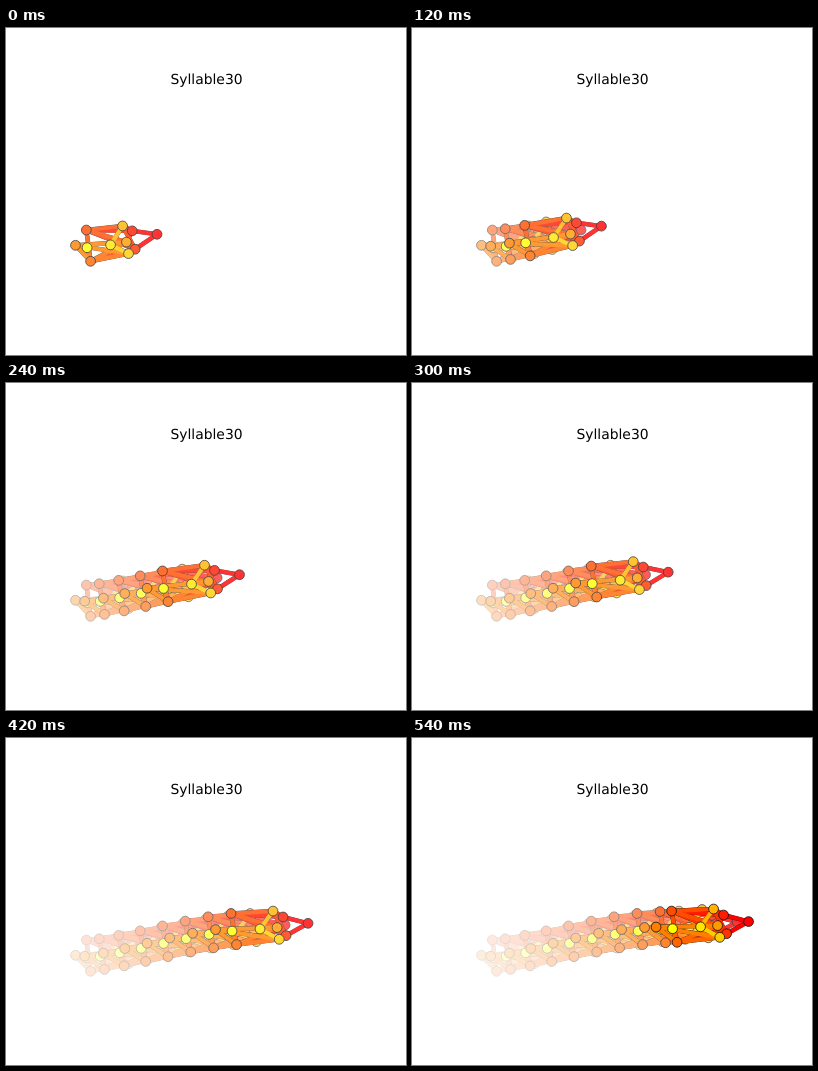
Animation, 400 px wide and 327 px high, one loop 600 ms. Source, as an HTML page with a canvas:

```html
<!DOCTYPE html>
<html lang="en">
<head>
<meta charset="utf-8">
<title>Syllable30</title>
<style>
  html, body { margin: 0; width: 100%; height: 100%; overflow: hidden; background: #fff; }
  canvas { display: block; }
</style>
</head>
<body>
<canvas id="stage" width="400" height="327"></canvas>
<script>
const W = 400, H = 327, STEPS = 10, STEP_MS = 60;
const ctx = document.getElementById('stage').getContext('2d');

// Stretched-out body, each joint relative to the nose
const body = {
  A: [0, 0],
  B: [-25, -3.3], C: [-22, 15],
  D: [-77, -0.5], E: [-71.5, 30], F: [-92.5, 17.5],
  G: [-31, 8], H: [-35, -8], I: [-28.8, 19.5],
  J: [-48, 11.5], K: [-76, 17]
};
const joints = Object.keys(body);

// A link takes the colour of its first joint
const links = 'AB AC BD BG BH CD CG CH CI CE DH DG DE EI EG EK FE FI FG FK HJ IJ'.split(' ');

const color = j => `rgb(255,${Math.round(255 * joints.indexOf(j) / (joints.length - 1))},0)`;

function ease(u) {
  u = Math.min(1, Math.max(0, u));
  return u * u * (3 - 2 * u);
}

// The run starts tucked up, gains speed, then the body levels out;
// the last step is only half as long
function pose(step) {
  const s = Math.min(step, 8.5);
  const noseX = 151 + 23.05 * s - 10.4 * (1 - Math.exp(-s / 1.5));
  const noseY = 206.3 - 4.5 * s + 0.215 * s * s;
  const lean = 0.13 * ease((s - 1.5) / 6.5);
  const tuck = 0.2 ** s;
  const place = ([x, y]) => {
    const pull = tuck * (-x / 92.5) ** 3;
    return [noseX + x + 11 * pull, noseY + y + lean * x - 6.5 * pull];
  };
  return Object.fromEntries(joints.map(j => [j, place(body[j])]));
}

function line(p, q, style, width) {
  ctx.strokeStyle = style;
  ctx.lineWidth = width;
  ctx.beginPath();
  ctx.moveTo(...p);
  ctx.lineTo(...q);
  ctx.stroke();
}

function drawPose(at) {
  for (const [a, b] of links) line(at[a], at[b], '#222', 4.5);
  for (const [a, b] of links) line(at[a], at[b], color(a), 4.17);
  ctx.strokeStyle = '#111';
  ctx.lineWidth = 0.8;
  for (const j of joints) {
    ctx.fillStyle = color(j);
    ctx.beginPath();
    ctx.arc(...at[j], 4.9, 0, 2 * Math.PI);
    ctx.fill();
    ctx.stroke();
  }
}

function veil(alpha) {
  ctx.fillStyle = `rgba(255,255,255,${alpha})`;
  ctx.fillRect(0, 0, W, H);
}

function draw(step) {
  veil(1);
  for (let i = 0; i <= step; i++) {
    drawPose(pose(i));
    if (i < STEPS - 1) veil(0.2);
  }
  ctx.fillStyle = '#000';
  ctx.font = '13.89px "DejaVu Sans", sans-serif';
  ctx.textRendering = 'geometricPrecision';
  ctx.textAlign = 'center';
  ctx.fillText('Syllable30', 200.5, 56);
}

let shown = -1;
function tick() {
  const step = Math.floor(performance.now() / STEP_MS) % STEPS;
  if (step !== shown) draw(shown = step);
  requestAnimationFrame(tick);
}
tick();
</script>
</body>
</html>
```
